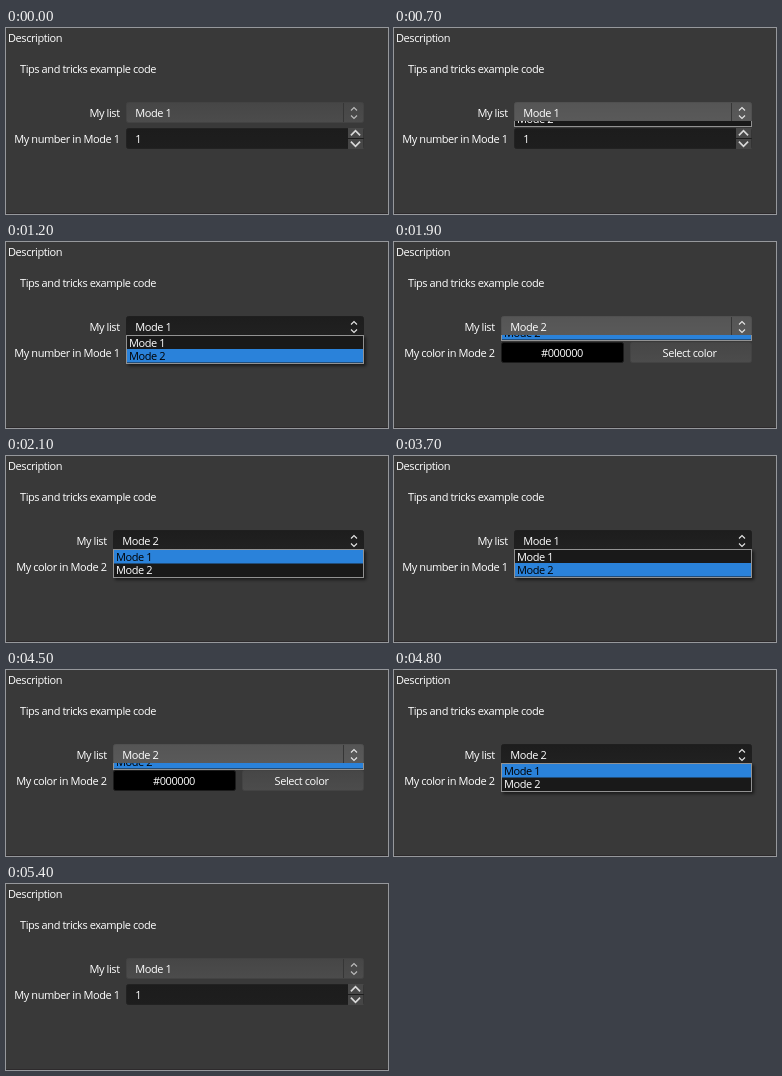
Recreate the animation shown at these times as an HTML page with a canvas. Size 382 by 186 pixels, loop 6 s.

```html
<!DOCTYPE html>
<html lang="en">
<head>
<meta charset="utf-8">
<title>Mode list</title>
<style>
html, body { margin: 0; width: 100%; height: 100%; overflow: hidden; background: #393939; }
canvas { display: block; width: 382px; height: 186px; }
</style>
</head>
<body>
<canvas id="stage" width="382" height="186"></canvas>
<script>
const ctx = document.getElementById('stage').getContext('2d');
const LOOP = 6000;
const RIGHT = 358;
const BLUE = '#2a82da';
const WHITE = '#fff';

// start time, mode, look of the list box, visible popup height, highlighted row
const steps = [
  [0, 1, 'idle'],
  [300, 1, 'hover'],
  [700, 1, 'press', 6, 1],
  [800, 1, 'open', 29, 1],
  [1200, 1, 'open', 29, 2],
  [1500, 2, 'idle'],
  [1600, 2, 'hover'],
  [1900, 2, 'press', 6, 2],
  [2000, 2, 'open', 29, 2],
  [2100, 2, 'open', 29, 1],
  [2700, 1, 'idle'],
  [2800, 1, 'hover'],
  [3200, 1, 'press', 6, 1],
  [3300, 1, 'open', 29, 1],
  [3700, 1, 'open', 29, 2],
  [3900, 2, 'idle'],
  [4000, 2, 'hover'],
  [4500, 2, 'press', 7, 2],
  [4600, 2, 'open', 29, 2],
  [4800, 2, 'open', 29, 1],
  [5200, 1, 'idle'],
  [5300, 1, 'hover'],
  [5400, 1, 'idle']
];

// top and bottom of the face, then its outline
const plain = ['#464646', '#4c4c4c', '#434343'];
const faces = {
  idle: plain,
  hover: plain,
  press: ['#555555', '#5a5a5a', '#505050'],
  open: ['#1d1d1d', '#212121', '#1f1f1f']
};

function rect(x, y, w, h, color) {
  ctx.fillStyle = color;
  ctx.fillRect(x, y, w, h);
}

function text(str, x, y, color = WHITE, align = 'left') {
  ctx.fillStyle = color;
  ctx.textAlign = align;
  ctx.fillText(str, x, y);
}

function box(x, y, w, h, [top, bottom, line]) {
  const g = ctx.createLinearGradient(0, y, 0, y + h);
  g.addColorStop(0, top);
  g.addColorStop(1, bottom);
  ctx.beginPath();
  ctx.roundRect(x + 0.5, y + 0.5, w - 1, h - 1, 2);
  ctx.fillStyle = g;
  ctx.fill();
  ctx.strokeStyle = line;
  ctx.lineWidth = 1;
  ctx.stroke();
}

function chevron(x, y, dir, size, color, width) {
  ctx.beginPath();
  ctx.moveTo(x - size, y + dir * size / 2);
  ctx.lineTo(x, y - dir * size / 2);
  ctx.lineTo(x + size, y + dir * size / 2);
  ctx.strokeStyle = color;
  ctx.lineWidth = width;
  ctx.stroke();
}

function listBox(left, mode, look) {
  box(left, 74, RIGHT - left, 21, faces[look]);
  if (look !== 'open') rect(337, 75, 1, 19, '#363636');
  const color = look === 'idle' ? '#bcbcbc' : '#e6e6e6';
  chevron(348, 81, 1, 3, color, 1.1);
  chevron(348, 89, -1, 3, color, 1.1);
  text('Mode ' + mode, left + 9.3, 89);
}

function numberRow(left) {
  box(left, 100, RIGHT - left, 21, ['#1c1c1c', '#1e1e1e', '#222222']);
  rect(342, 100, 15.5, 10, '#484848');
  rect(342, 111, 15.5, 10, '#464646');
  chevron(349.5, 105, 1, 4.6, '#d8d8d8', 1.7);
  chevron(349.5, 116, -1, 4.6, '#d8d8d8', 1.7);
  text('1', left + 9.3, 115);
}

function colorRow(left) {
  box(left, 100, 123, 21, ['#000', '#000', '#1c1c1c']);
  text('#000000', 168, 115, WHITE, 'center');
  box(236, 100, 122, 21, plain);
  text('Select color', 295.5, 115, WHITE, 'center');
}

// The list rolls down out of the box, its lower end first.
function popup(left, shown, active) {
  const w = RIGHT - left;
  ctx.save();
  if (shown === 29) {
    ctx.shadowColor = 'rgba(0,0,0,.55)';
    ctx.shadowBlur = 3;
    ctx.shadowOffsetX = ctx.shadowOffsetY = 2;
    rect(left, 93, w, 29, '#191919');
    ctx.shadowColor = 'transparent';
  }
  ctx.beginPath();
  ctx.rect(left, 93, w, shown);
  ctx.clip();
  ctx.translate(0, shown - 29);
  rect(left, 93, w, 29, '#929292');
  rect(left + 1, 94, w - 2, 27, '#191919');
  for (const row of [1, 2]) {
    const y = 94 + (row - 1) * 13;
    if (row === active) rect(left + 1, y, w - 2, 13.5, BLUE);
    text('Mode ' + row, left + 3, y + 11, row === active ? '#000' : WHITE);
  }
  ctx.restore();
}

function draw(t) {
  const [, mode, look, shown, active] = steps.findLast(s => s[0] <= t);
  const left = mode === 1 ? 120 : 107;
  rect(0, 0, 382, 186, '#393939');
  rect(0, 185, 382, 1, '#2d2a2c');

  ctx.font = '11px "Open Sans", "Noto Sans", sans-serif';
  ctx.letterSpacing = '-0.42px';
  text('Description', 2, 14);
  text('Tips and tricks example code', 14, 45);
  text('My list', left - 6.4, 89, WHITE, 'right');
  text(mode === 1 ? 'My number in Mode 1' : 'My color in Mode 2', left - 6.4, 115, WHITE, 'right');

  listBox(left, mode, look);
  (mode === 1 ? numberRow : colorRow)(left);
  if (shown) popup(left, shown, active);
}

const start = performance.now();
function tick() {
  draw((performance.now() - start) % LOOP);
  requestAnimationFrame(tick);
}
tick();
</script>
</body>
</html>
```
